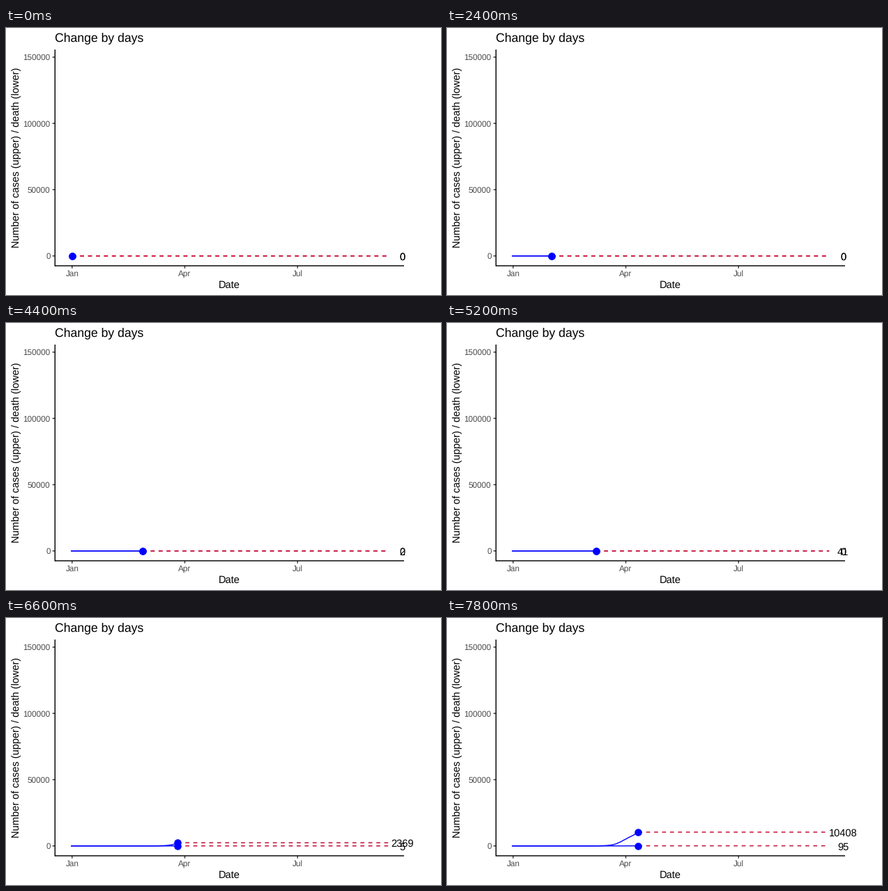
A matplotlib script for the animation above (8000 ms loop, 624 by 384 pixels).

```python
import math
import matplotlib.pyplot as plt
import numpy as np
from matplotlib.animation import FuncAnimation

W, H, DPI = 624, 384, 96
FRAMES, STEP_MS = 40, 200
LEFT, RIGHT, TOP, BOTTOM = 70.3, 571, 31, 342
JAN_X, DAY_PX = 94.8, 1.777
ZERO_Y, UNIT_PX = 327.8, 285.9 / 150000
END_X, LABEL_X = 548.2, 568.2
LINE_W = 1.07
DAYS_PER_FRAME = 2.59

# (day since 1 January, running total); growth is exponential in between
CASES = [(52, 1), (57, 2), (61, 10), (77, 427), (85, 2369), (89, 4247),
         (93, 6252), (101, 10408)]
DEATHS = [(80, 1), (85, 5), (93, 34), (101, 95)]

plt.rcParams["font.family"] = "Liberation Sans"
plt.rcParams["text.hinting"] = "none"
plt.rcParams["text.hinting_factor"] = 8

fig = plt.figure(figsize=(W / DPI, H / DPI), dpi=DPI, facecolor="white")
ax = fig.add_axes([0, 0, 1, 1])
ax.set_xlim(0, W)
ax.set_ylim(H, 0)
ax.axis("off")


def x_of(day):
    return JAN_X + DAY_PX * day


def y_of(value):
    return ZERO_Y - UNIT_PX * value


def total(keys, day):
    days, values = zip(*keys)
    if day < days[0]:
        return 0
    return round(math.exp(np.interp(day, days, np.log(values))))


def stroke(xs, ys, color, **kw):
    return ax.plot(xs, ys, color=color, lw=LINE_W, snap=False,
                   solid_capstyle="butt", **kw)[0]


def write(x, y, s, size=11, color="black", ha="center", va="baseline", **kw):
    return ax.text(x, y, s, fontsize=size, color=color, ha=ha, va=va, **kw)


def draw_axes():
    for value in range(0, 150001, 50000):
        y = y_of(value)
        stroke([LEFT - 3.67, LEFT], [y, y], "#333333")
        write(63.6, y + 4.3, str(value), 8.8, "#4d4d4d", "right")
    for day, name in ((0, "Jan"), (91, "Apr"), (182, "Jul")):
        x = x_of(day)
        stroke([x, x], [BOTTOM, BOTTOM + 3.67], "#333333")
        write(x, 357, name, 8.8, "#4d4d4d")
    stroke([LEFT, RIGHT], [BOTTOM, BOTTOM], "black")
    stroke([LEFT, LEFT], [TOP, BOTTOM + 0.7], "black")
    write(70, 19.5, "Change by days", 13.2, ha="left")
    write(320.6, 374, "Date")
    write(21.6, 186.7, "Number of cases (upper) / death (lower)",
          ha="right", va="center", rotation=90)


class Series:
    def __init__(self, keys):
        self.keys = keys
        self.guide = stroke([], [], "#c4002f", dashes=(4, 4), zorder=3)
        self.curve = stroke([], [], "blue", zorder=4)
        self.dot = ax.plot([], [], "o", color="blue", ms=7.9, mew=0,
                           snap=False, zorder=5)[0]
        self.label = write(LABEL_X, 0, "", zorder=6)

    def show(self, day):
        days = range(-1, day + 1)
        totals = [total(self.keys, d) for d in days]
        x, y = x_of(day), y_of(totals[-1])
        self.guide.set_data([x, END_X], [y, y])
        self.curve.set_data([x_of(d) for d in days],
                            [y_of(t) for t in totals])
        self.dot.set_data([x], [y])
        self.label.set_y(y + 6)
        self.label.set_text(str(totals[-1]))
        return [self.guide, self.curve, self.dot, self.label]


draw_axes()
series = [Series(CASES), Series(DEATHS)]


def update(frame):
    day = math.floor(DAYS_PER_FRAME * (frame + 0.5)) - 1
    return [artist for s in series for artist in s.show(day)]


anim = FuncAnimation(fig, update, frames=FRAMES, interval=STEP_MS,
                     repeat=True, repeat_delay=0, blit=False)
plt.show()
```
